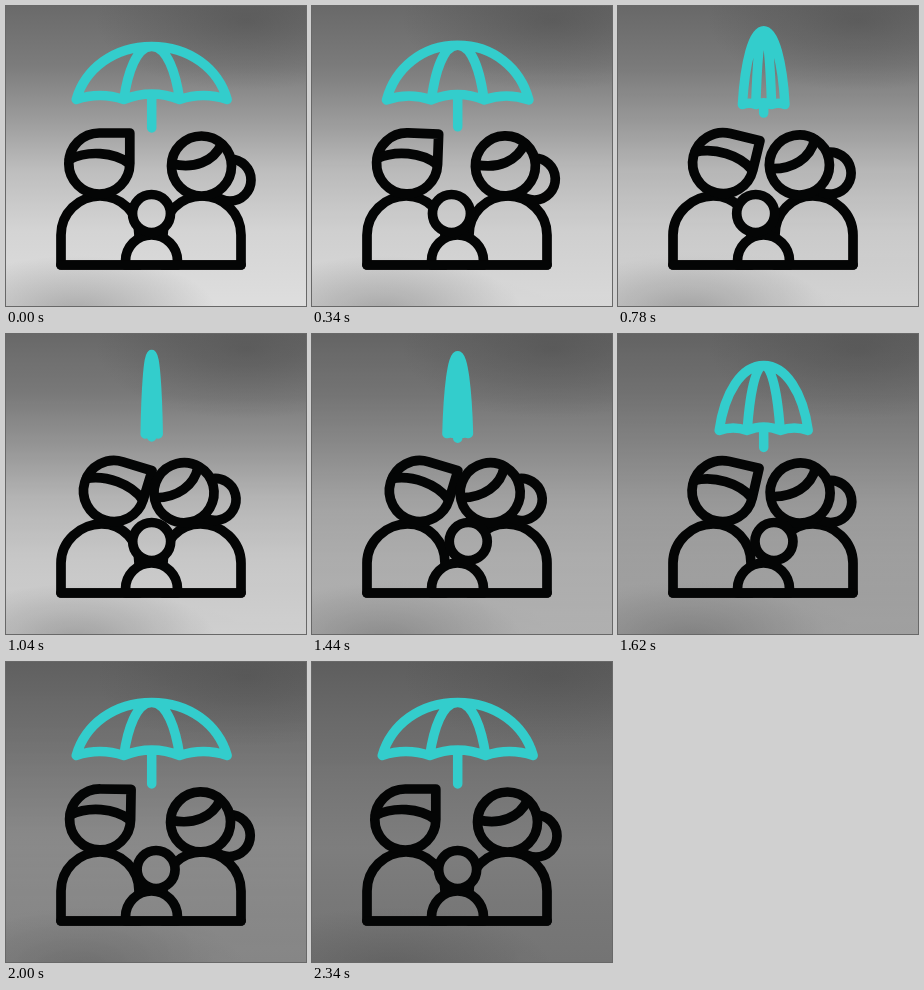
Write an HTML page with a canvas that moves like this. It is 300 px wide and 300 px high and loops after 2400 ms.

```html
<!DOCTYPE html>
<html lang="en">
<head>
<meta charset="utf-8">
<title>Family under an umbrella</title>
<style>
  html, body { margin: 0; width: 100%; height: 100%; overflow: hidden; }
  .sky, canvas { position: absolute; inset: 0; width: 100%; height: 100%; }
  .light {
    background:
      radial-gradient(ellipse 150px 70px at 240px 15px, rgba(60,60,60,.35), transparent),
      radial-gradient(ellipse 140px 55px at 70px 305px, rgba(120,120,120,.5), transparent),
      linear-gradient(#6a6a6a, #7c7c7c 20%, #9c9c9c 38%, #bebebe 55%, #d4d4d4 75%, #dedede);
  }
  .dark {
    background:
      radial-gradient(ellipse 150px 70px at 240px 15px, rgba(60,60,60,.25), transparent),
      radial-gradient(ellipse 160px 60px at 80px 305px, rgba(70,70,70,.4), transparent),
      linear-gradient(#5e5e5e, #6a6a6a 20%, #747474 40%, #7c7c7c 60%, #767676 80%, #727272);
  }
</style>
</head>
<body>
<div class="sky light"></div>
<div class="sky dark" id="dark"></div>
<canvas id="stage"></canvas>
<script>
const LOOP = 2400, INK = '#040505', TEAL = '#33cdcc';
const dark = document.getElementById('dark');
const stage = document.getElementById('stage');
const ctx = stage.getContext('2d');
const ratio = window.devicePixelRatio || 1;
stage.width = stage.height = 300 * ratio;

// Each track is a list of [time, value].
const tracks = {
  fold: [[0, 0], [220, 0], [1020, 1], [1370, 1], [1840, 0], [LOOP, 0]],
  lean: [[0, 0], [150, 0], [1030, 1], [1400, 1], [2100, 0], [LOOP, 0]],
  child: [[0, 145.5], [600, 135.5], [1500, 156.5], [LOOP, 145.5]],
  dusk: [[0, 0], [1040, .13], [1440, .42], [1780, .7], [LOOP, 1]]
};
const smooth = x => x * x * (3 - 2 * x);
const mix = (a, b, k) => a + (b - a) * k;

function at(track, t, ease = smooth) {
  const i = track.findIndex(key => key[0] > t);
  const [t0, a] = track[i - 1], [t1, b] = track[i];
  return mix(a, b, ease((t - t0) / (t1 - t0)));
}

// Outlines hide whatever lies behind them, down to the sky.
function outline(path, solid = true) {
  if (solid) {
    ctx.globalCompositeOperation = 'destination-out';
    ctx.fill(path);
    ctx.globalCompositeOperation = 'source-over';
  }
  ctx.stroke(path);
}

function place(x, y, angle, draw) {
  ctx.save();
  ctx.translate(x, y);
  ctx.rotate(angle * Math.PI / 180);
  draw();
  ctx.restore();
}

function circle(x, y, r) {
  const path = new Path2D();
  path.arc(x, y, r, 0, Math.PI * 2);
  return path;
}

// The feet stay put while the shoulders shift sideways.
function body(x, shift) {
  const top = x + shift;
  return new Path2D(`M${x - 39} 259V229C${x - 39} 207.5 ${top - 21.5} 190 ${top} 190` +
    `S${x + 39} 207.5 ${x + 39} 229V259Z`);
}

const shapes = {
  child: new Path2D('M119.5 259V255a26 26 0 0 1 52 0V259Z'),
  manHead: new Path2D('M30.5-30.5H0A30.5 30.5 0 0 0-30.5 0A30.5 30.5 0 0 0 30.5 0Z'),
  manHair: new Path2D('M-30-4C-12-13 14-12 30 0'),
  womanHead: circle(0, 0, 30),
  womanHair: new Path2D('M-29-2C-8 3 12-4 20-22'),
  bun: circle(28.5, 14, 21)
};

function umbrella(k) {
  const w = mix(75.5, 6.5, k), rib = w * .37;
  const top = mix(40.5, 20.5, k), rim = mix(93.5, 100, k);
  const end = mix(122, 103, k), h = rim - top;
  const sag = mix(8, 1, k);
  ctx.strokeStyle = TEAL;
  ctx.lineWidth = 9.5;
  place(145.7, 0, 0, () => {
    ctx.stroke(new Path2D(
      `M${-w} ${rim}C${-w * .88} ${rim - h * .58} ${-w * .5} ${top} 0 ${top}` +
      `S${w * .88} ${rim - h * .58} ${w} ${rim}` +
      `Q${(w + rib) / 2} ${rim - sag} ${rib} ${rim}Q0 ${rim - sag * 1.4} ${-rib} ${rim}` +
      `Q${-(w + rib) / 2} ${rim - sag} ${-w} ${rim}Z` +
      `M${-rib} ${rim}C${-rib * .86} ${rim - h * .5} ${-rib * .55} ${top} 0 ${top}` +
      `S${rib * .86} ${rim - h * .5} ${rib} ${rim}` +
      `M0 ${rim - sag / 2}V${end}`));
  });
}

function family(lean, childX) {
  ctx.strokeStyle = INK;
  ctx.lineWidth = 9.7;
  outline(body(94, 1.5 * lean));
  outline(body(196, -1.5 * lean));
  place(mix(93.3, 108, lean), mix(157.5, 157, lean), 17 * lean, () => {
    outline(shapes.manHead);
    ctx.stroke(shapes.manHair);
  });
  place(mix(195.5, 178, lean), mix(160, 158.7, lean), -14 * lean, () => {
    outline(shapes.bun, false);
    outline(shapes.womanHead);
    ctx.stroke(shapes.womanHair);
  });
  outline(shapes.child);
  outline(circle(childX, 207.5, 19));
  ctx.stroke(new Path2D('M55 259H235'));
}

function render(now) {
  const t = now % LOOP;
  dark.style.opacity = at(tracks.dusk, t, x => x);
  ctx.setTransform(ratio, 0, 0, ratio, 0, 0);
  ctx.clearRect(0, 0, 300, 300);
  ctx.lineCap = ctx.lineJoin = 'round';
  family(at(tracks.lean, t), at(tracks.child, t));
  umbrella(at(tracks.fold, t));
}

const start = performance.now();
function tick() {
  render(performance.now() - start);
  requestAnimationFrame(tick);
}
tick();
</script>
</body>
</html>
```
